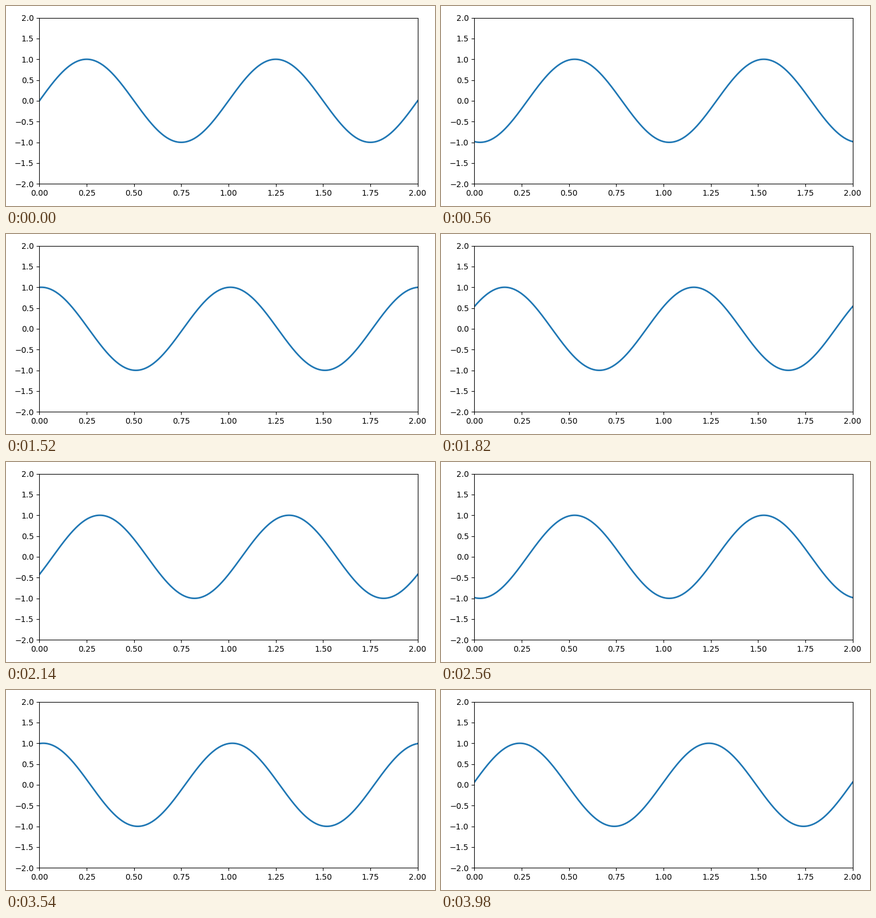
A matplotlib script that plays this animation: 750 px wide and 350 px high, repeating every 4 s.

```python
import numpy as np
import matplotlib.pyplot as plt
from matplotlib.animation import FuncAnimation

FRAMES = 200
INTERVAL = 20  # ms
STEP = 0.01    # phase shift per frame, in x units

fig, ax = plt.subplots(figsize=(7.5, 3.5), dpi=100)
ax.set(xlim=(0, 2), ylim=(-2, 2))

x = np.linspace(0, 2, 1000)
line, = ax.plot([], [], lw=2)
fig.tight_layout()


def update(i):
    line.set_data(x, np.sin(2 * np.pi * (x - STEP * i)))
    return line,


anim = FuncAnimation(fig, update, frames=FRAMES, interval=INTERVAL,
                     init_func=lambda: update(0), repeat=True, repeat_delay=0)
plt.show()
```
